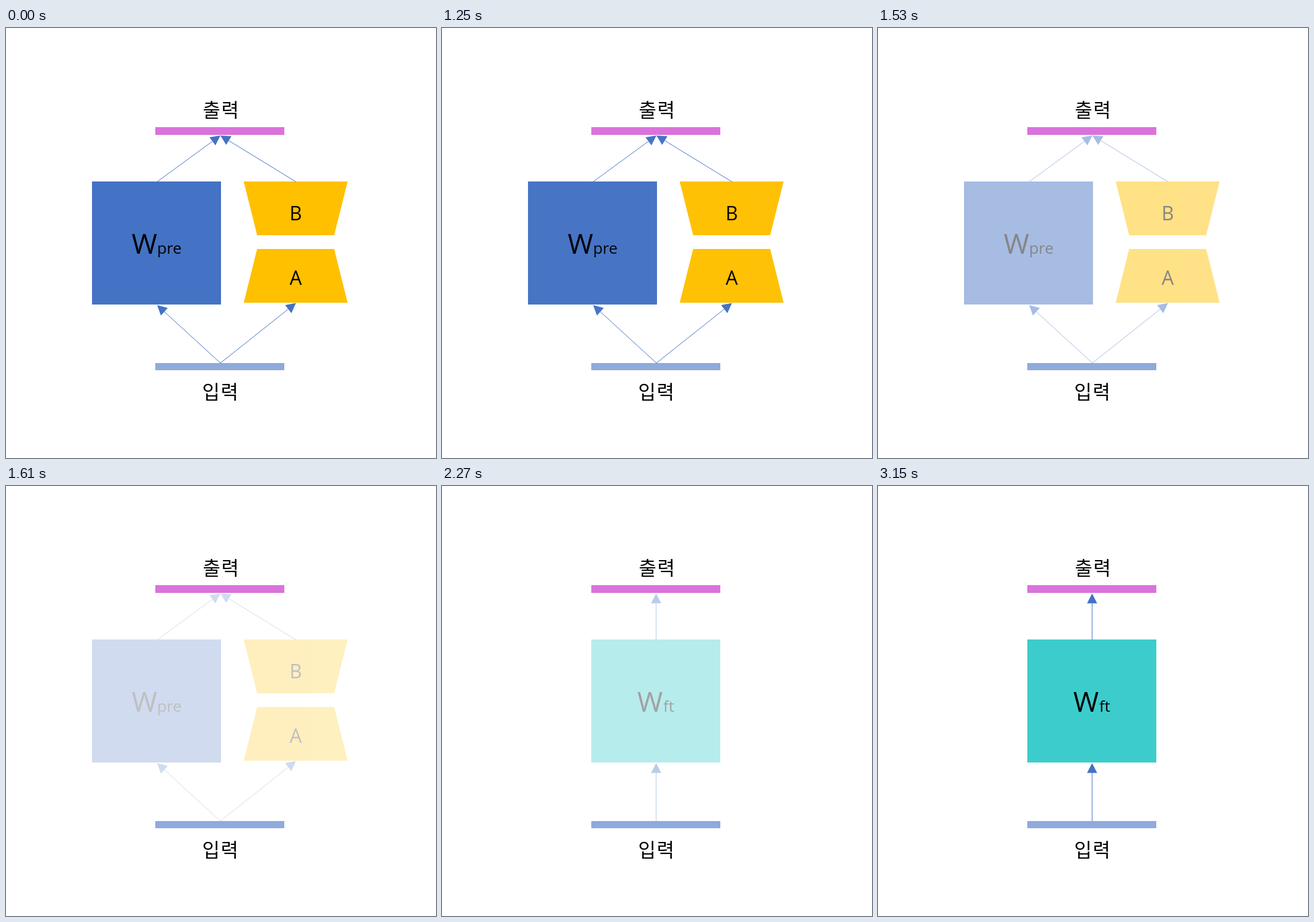
These frames come from a looping animation (720x720 px, 4.32 s). An HTML page:

```html
<!DOCTYPE html>
<html lang="ko">
<head>
<meta charset="utf-8">
<title>Weight merge</title>
<style>
  html, body { margin: 0; width: 100%; height: 100%; overflow: hidden; background: #fff; }
  svg { display: block; width: 100vw; height: 100vh; }
  text { font-family: "Open Sans", "Noto Sans", sans-serif; }
  .label { font: 350 32px "Noto Sans CJK KR", "Noto Sans CJK", sans-serif; letter-spacing: 1.5px; }
  .big { font-size: 46px; }
  .sub { font-size: 26.3px; }
  .mid { font-size: 32px; text-anchor: middle; }
  .arrow { stroke: #4472c4; stroke-width: 1; }
  .arrow polygon { fill: #4472c4; stroke: none; }
</style>
</head>
<body>
<svg viewBox="0 0 720 720">
  <rect x="250" y="166" width="216" height="13" fill="#da72dc"/>
  <rect x="250" y="561" width="216" height="12" fill="#8faadc"/>
  <text class="label" x="329.5" y="149">출력</text>
  <text class="label" x="328.5" y="621">입력</text>

  <g id="split">
    <rect x="144" y="257" width="216" height="206" fill="#4472c4"/>
    <path d="M398 257H572L549.5 347H420.5ZM420.5 370H549.5L572 460H398Z" fill="#ffc000"/>
    <text class="big" x="210.5" y="378">W</text>
    <text class="sub" x="253" y="378">pre</text>
    <text class="mid" x="485" y="322">B</text>
    <text class="mid" x="485" y="430">A</text>
  </g>

  <g id="merged">
    <rect x="250" y="257" width="216" height="206" fill="#3dcccc"/>
    <text class="big" x="327" y="378">W</text>
    <text class="sub" x="370.5" y="378">ft</text>
  </g>
</svg>
<script>
  const LOOP = 4320, STEP = 40;
  const split = document.getElementById('split');
  const merged = document.getElementById('merged');

  // Draws a thin shaft from (x1, y1) with a solid head whose tip is at (x2, y2).
  function addArrow(group, x1, y1, x2, y2) {
    const d = Math.hypot(x2 - x1, y2 - y1);
    const ux = (x2 - x1) / d, uy = (y2 - y1) / d;
    const bx = x2 - ux * 16.5, by = y2 - uy * 16.5;
    const wx = -uy * 8.5, wy = ux * 8.5;
    group.insertAdjacentHTML('beforeend', `<g class="arrow">
      <line x1="${x1}" y1="${y1}" x2="${bx}" y2="${by}"/>
      <polygon points="${x2},${y2} ${bx + wx},${by + wy} ${bx - wx},${by - wy}"/>
    </g>`);
  }

  // Every column receives from the input bar and feeds the output bar.
  function addColumn(group, x, bottom, middle) {
    addArrow(group, x, 257.5, middle, 180);
    addArrow(group, middle, 561, x, bottom);
  }

  addColumn(split, 253, 464, 359);
  addColumn(split, 485.5, 460.5, 359);
  addColumn(merged, 358.5, 464, 358.5);

  // Progress from 0 to 1, advancing in whole steps.
  function progress(time, start, duration, lag = 0) {
    const elapsed = Math.floor((time - start) / STEP) * STEP + lag;
    return Math.min(1, Math.max(0, elapsed / duration));
  }

  const begin = performance.now();
  function render() {
    const t = Math.max(0, performance.now() - begin) % LOOP;
    split.setAttribute('opacity', 1 - progress(t, 1210, 480) ** 1.56);
    merged.setAttribute('opacity', progress(t, 2110, 500, 22));
    requestAnimationFrame(render);
  }
  render();
</script>
</body>
</html>
```
